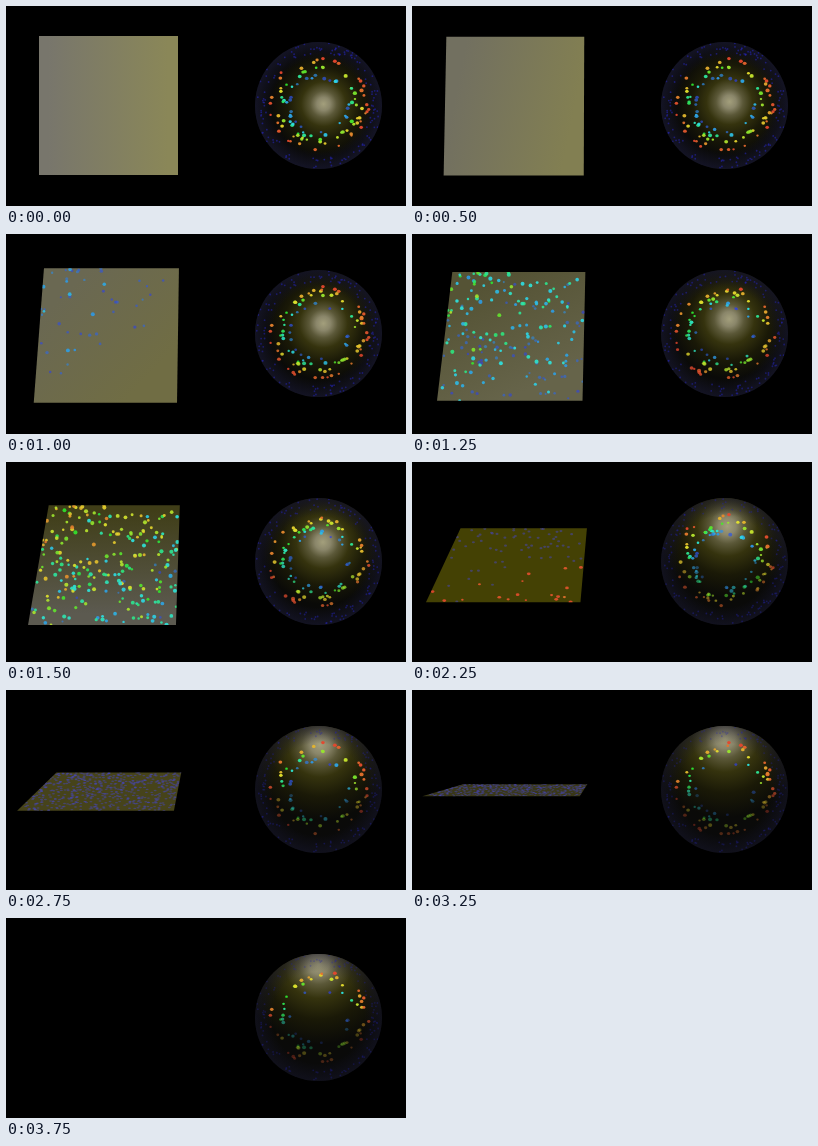
These frames come from a looping animation (400 px wide and 200 px high, 4000 ms). An HTML page with a canvas:

```html
<!DOCTYPE html>
<html>
<head>
<meta charset="utf-8">
<style>
html, body { margin: 0; width: 100%; height: 100%; overflow: hidden; background: #000; }
canvas { display: block; }
</style>
</head>
<body>
<canvas id="stage" width="400" height="200"></canvas>
<script>
const ctx = document.getElementById('stage').getContext('2d');
const STEPS = 16, STEP_MS = 250;
const BALL = { x: 312.5, y: 99.5, r: 63.5 };

// Hues from short to long wavelengths
const HUES = [234, 205, 182, 150, 85, 58, 42, 22, 8];

// Plate shading: step, start RGB, end RGB
const SHADES = [
  [0, [120, 118, 108], [138, 135, 88]],
  [2, [114, 112, 96], [130, 127, 82]],
  [4, [106, 104, 82], [112, 109, 68]],
  [6, [64, 62, 24], [92, 90, 80]],
  [9, [68, 65, 4], [68, 65, 4]],
  [11, [70, 67, 26], [70, 67, 26]],
  [15, [44, 42, 20], [44, 42, 20]]
];

function seeded(seed) {
  return () => {
    seed = (seed * 1664525 + 1013904223) % 4294967296;
    return seed / 4294967296;
  };
}

const rand = seeded(71);
const make = (count, build) => Array.from({ length: count }, build);
const plateFlakes = make(600, () => ({
  u: rand(), v: rand(), spread: rand() + rand() - 1, size: 1.2 + rand() * 0.9
}));
const ballFlakes = make(210, (_, i) => ({
  angle: (i + rand()) * 2.4, t: rand(), spread: rand() - 0.5,
  phase: rand() * Math.PI * 2, size: 1.2 + rand() * 0.9
}));
const rimFlakes = make(260, () => ({
  angle: rand() * Math.PI * 2, r: 52 + rand() * 11, phase: rand() * Math.PI * 2
}));

const lerp = (a, b, t) => a + (b - a) * t;
const clamp = t => Math.max(0, Math.min(1, t));
const rgb = c => `rgb(${c.map(Math.round)})`;

function dot(x, y, rx, ry, color, alpha = 1) {
  ctx.globalAlpha = alpha;
  ctx.fillStyle = color;
  ctx.beginPath();
  ctx.ellipse(x, y, rx, ry, 0, 0, Math.PI * 2);
  ctx.fill();
  ctx.globalAlpha = 1;
}

// Wavelength in nm to a spectral colour
function spectrum(nm) {
  const pos = clamp((nm - 410) / 260) * (HUES.length - 1);
  const i = Math.min(HUES.length - 2, Math.floor(pos));
  const hue = lerp(HUES[i], HUES[i + 1], pos - i);
  return `hsl(${hue}, 78%, 54%)`;
}

function project(u, v, tilt) {
  const x = 33 + 139 * u - 204, y = (v - 0.5) * 139;
  const k = 590 / (590 - y * Math.sin(tilt));
  return [204 + x * k, 99.5 + y * Math.cos(tilt) * k];
}

function plateColors(step) {
  const i = Math.max(1, SHADES.findIndex(s => s[0] >= step));
  const [s0, a0, b0] = SHADES[i - 1], [s1, a1, b1] = SHADES[i];
  const t = (step - s0) / (s1 - s0);
  const mix = (p, q) => rgb(p.map((c, n) => lerp(c, q[n], t)));
  return [mix(a0, a1), mix(b0, b1)];
}

function drawPlate(step, tilt) {
  const corners = [[0, 0], [1, 0], [1, 1], [0, 1]].map(([u, v]) => project(u, v, tilt));
  const dir = Math.min(Math.PI / 2, tilt * 3);
  const dx = 60 * Math.cos(dir), dy = 60 * Math.sin(dir) * Math.cos(tilt);
  const shade = ctx.createLinearGradient(102 - dx, 100 - dy, 102 + dx, 100 + dy);
  const [from, to] = plateColors(step);
  shade.addColorStop(0, from);
  shade.addColorStop(1, to);

  ctx.save();
  ctx.fillStyle = shade;
  ctx.beginPath();
  corners.forEach(p => ctx.lineTo(...p));
  ctx.closePath();
  ctx.fill();
  ctx.clip();

  const s = Math.sin(tilt);
  const flat = Math.min(1, Math.cos(tilt) + 0.2);
  const scatter = 400 * s * (1 - s);
  plateFlakes.forEach((f, i) => {
    const [x, y] = project(f.u, f.v, tilt);
    const first = lerp(270 + 625 * s, 212 + 570 * s, f.v) - 45 * f.u + scatter * f.spread;
    const second = 400 + (s - 0.84) * 420 - 25 * f.v + 35 * f.spread;
    if (i < 230 && first > 405 && first < 670) {
      const blue = first < 440;
      const size = blue ? f.size * 0.85 : f.size;
      dot(x, y, size, size * flat, spectrum(first), blue ? 0.6 : 0.9);
    } else if (second > 412) {
      dot(x, y, 1.5, 1.5 * flat, '#4646c0', 0.5);
    }
  });
  ctx.restore();
}

function drawBall(tilt) {
  const degrees = tilt * 180 / Math.PI;
  const late = degrees / 89;
  const lx = BALL.x + 5 * (1 - late * late), ly = 98 - 0.58 * degrees;

  ctx.save();
  ctx.beginPath();
  ctx.arc(BALL.x, BALL.y, BALL.r, 0, Math.PI * 2);
  ctx.clip();
  const glow = ctx.createRadialGradient(lx, ly, 0, lx, ly, lerp(66, 100, late));
  glow.addColorStop(0, '#a39f7c');
  glow.addColorStop(0.1, '#8a866a');
  glow.addColorStop(0.2, '#5b5838');
  glow.addColorStop(0.34, '#35330e');
  glow.addColorStop(0.55, '#1a1907');
  glow.addColorStop(0.8, '#0a0a08');
  glow.addColorStop(1, '#0a0a0a');
  ctx.fillStyle = glow;
  ctx.fillRect(245, 32, 136, 136);

  const edge = ctx.createRadialGradient(BALL.x, BALL.y, 46, BALL.x, BALL.y, BALL.r);
  edge.addColorStop(0, 'rgba(22,22,44,0)');
  edge.addColorStop(1, `rgba(22,22,44,${lerp(0.8, 0.5, late)})`);
  ctx.fillStyle = edge;
  ctx.fillRect(245, 32, 136, 136);

  rimFlakes.forEach(f => {
    if (Math.cos(f.phase + tilt * 4) < 0.1) return;
    dot(BALL.x + f.r * Math.cos(f.angle), BALL.y + f.r * Math.sin(f.angle),
      0.9, 0.9, '#2323a8', lerp(0.65, 0.3, late));
  });

  ballFlakes.forEach(f => {
    if (Math.cos(f.phase + tilt * 5) < lerp(0, 0.35, late)) return;
    const r = 28 + 23 * f.t, down = Math.sin(f.angle);
    const nm = 425 + 250 * f.t + 50 * f.spread;
    const dim = 1 - 0.7 * late * clamp(down * 2 + 0.4);
    const alpha = (nm < 440 ? 0.7 : 0.95) * dim;
    dot(BALL.x + r * Math.cos(f.angle), BALL.y - 1 + r * down * 0.93,
      f.size, f.size * 0.9, spectrum(nm), alpha);
  });
  ctx.restore();
}

function draw(now) {
  const step = Math.floor(now / STEP_MS) % STEPS;
  const tilt = 89 * Math.PI / 180 * (1 - Math.cos(Math.PI * step / 15)) / 2;
  ctx.fillStyle = '#000';
  ctx.fillRect(0, 0, 400, 200);
  if (step < 15) drawPlate(step, tilt);
  drawBall(tilt);
  requestAnimationFrame(draw);
}
requestAnimationFrame(draw);
</script>
</body>
</html>
```
